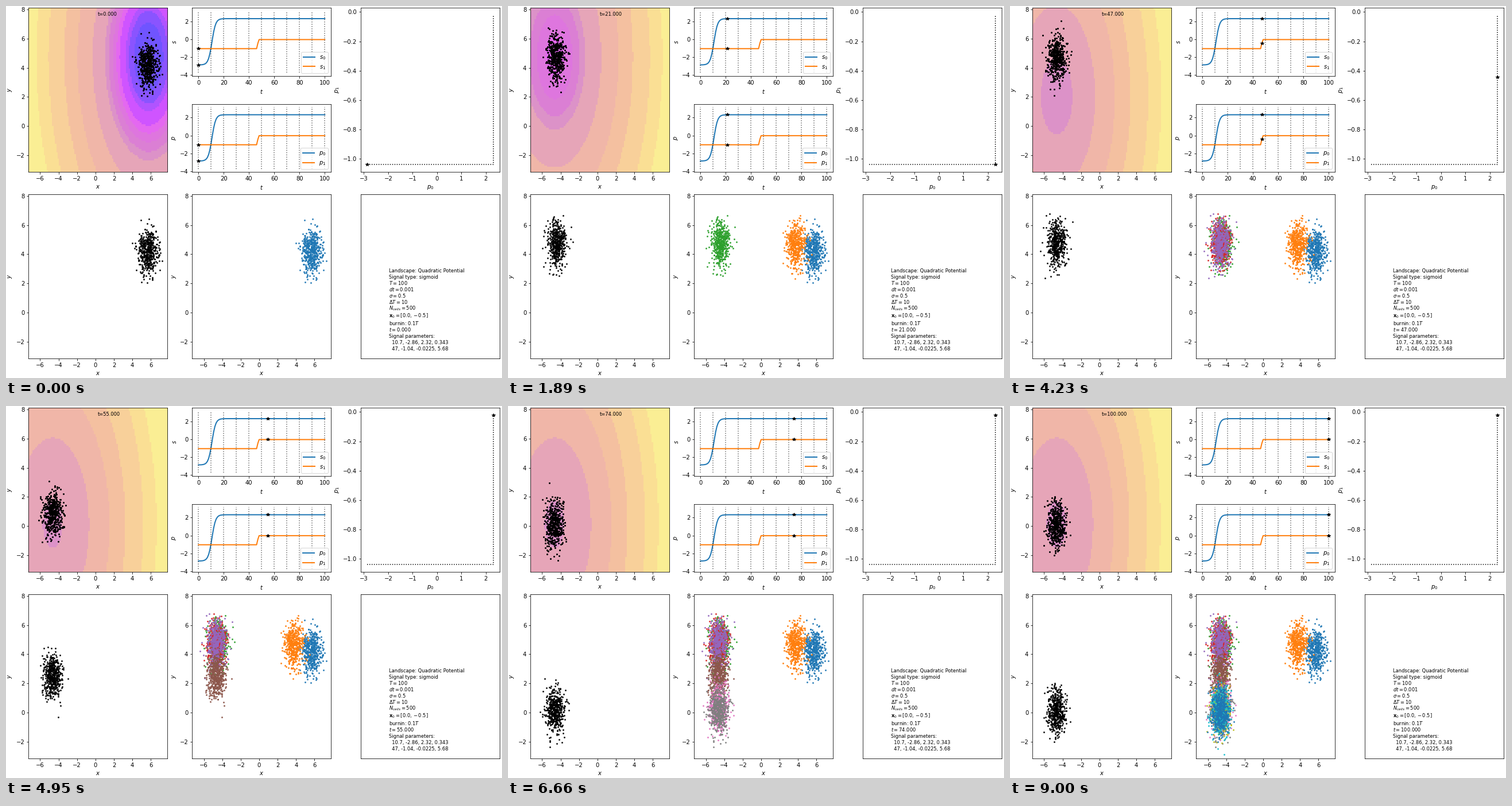
Write a matplotlib script that moves like this. It is 864x648 px and loops after 9.09 s.

```python
import numpy as np
import matplotlib.pyplot as plt
from matplotlib.animation import FuncAnimation
from matplotlib.colors import BoundaryNorm, ListedColormap

W, H, DPI = 864, 648, 72
T, DELTA, BURN = 100, 10, 10
N_CELLS, SIGMA = 500, 0.5
K = np.array([0.5, 0.22])            # stiffness of the potential in x and y
XLIM, YLIM = (-7.26, 7.80), (-3.15, 8.12)

# panel edges in pixels from the top left
LEFT, MID, RIGHT = 39.2, 324.3, 618.4
UPPER, LOWER = (3.2, 289.0), (328.0, 613.8)

LEVELS = [-99, -10, -9.5, -9.1, -8.2, -7.6, -6.9, -6.0, -5.1, -1.5,
          4, 10, 18.5, 26, 199]
BANDS = [(112, 84, 255), (138, 84, 255), (176, 84, 255), (207, 84, 255),
         (228, 104, 240), (222, 118, 222), (219, 127, 212), (220, 146, 200),
         (230, 165, 184), (240, 182, 168), (244, 192, 160), (248, 208, 154),
         (250, 223, 148), (250, 238, 148)]

INFO = [
    "Landscape: Quadratic Potential",
    "Signal type: sigmoid",
    r"$T=100$",
    r"$dt=0.001$",
    r"$\sigma=0.5$",
    r"$\Delta T=10$",
    r"$N_{cells}=500$",
    r"$\mathbf{x}_0=[0.0, -0.5]$",
    r"burnin: $0.1T$",
    "",
    "Signal parameters:",
    "  10.7, -2.86, 2.32, 0.343",
    "  47, -1.04, -0.0225, 5.68",
]
TIME_ROW = INFO.index("")


def sigmoid(t, center, low, high, rate):
    return low + (high - low) / 2 * (1 + np.tanh(rate * (t - center)))


def signal(t):
    t = np.maximum(t, 0)
    return np.array([sigmoid(t, 10.68, -2.86, 2.32, 0.343),
                     sigmoid(t, 46.97, -1.04, -0.0225, 5.68)])


def simulate(dt=0.02):
    """Euler-Maruyama run; returns the cells at every whole time."""
    rng = np.random.default_rng(7)
    cells = np.tile([0.0, -0.5], (N_CELLS, 1))
    per_unit = round(1 / dt)
    kept = []
    for i in range((BURN + T) * per_unit + 1):
        t = i * dt - BURN
        if i >= BURN * per_unit and i % per_unit == 0:
            kept.append(cells.copy())
        noise = rng.standard_normal(cells.shape)
        cells = cells - (K * cells + signal(t)) * dt + SIGMA * np.sqrt(dt) * noise
    return kept


def centers(lim, n=100):
    edges = np.linspace(*lim, n + 1)
    return (edges[1:] + edges[:-1]) / 2


GX, GY = np.meshgrid(centers(XLIM), centers(YLIM))


def potential(p):
    return K[0] / 2 * GX**2 + K[1] / 2 * GY**2 + p[0] * GX + p[1] * GY


times = np.arange(T + 1)
sig = signal(times)
cells = simulate()

fig = plt.figure(figsize=(W / DPI, H / DPI), dpi=DPI)


def panel(left, span, xlabel="", ylabel="", width=242):
    top, bottom = span
    ax = fig.add_axes([left / W, 1 - bottom / H, width / W, (bottom - top) / H])
    ax.set_xlabel(xlabel)
    ax.set_ylabel(ylabel)
    return ax


def plane(left, span):
    ax = panel(left, span, "$x$", "$y$")
    ax.set_xticks(range(-6, 7, 2))
    ax.set_yticks(range(-2, 9, 2))
    ax.set_xlim(XLIM)
    ax.set_ylim(YLIM)
    return ax


def dots(ax, xy, color, alpha=1.0):
    return ax.plot(*xy.T, ".", color=color, ms=4, alpha=alpha)[0]


def signal_panel(span, name):
    ax = panel(MID, span, "$t$", f"${name}$")
    for i in range(2):
        ax.plot(times, sig[i], lw=2, label=f"${name}_{i}$")
    ax.vlines(np.arange(0, T + 1, DELTA), -3.73, 3.18, colors="k",
              linestyles=":", linewidth=1.5, alpha=0.6)
    ax.set_xticks(range(0, 101, 20))
    ax.set_yticks(range(-4, 3, 2))
    ax.set_xlim(-5, 105)
    ax.set_ylim(-4.08, 3.53)
    ax.legend(loc="lower right")
    return ax.plot([0, 0], sig[:, 0], "k*")[0]


def info_lines(x=667, last=599.6, step=10.95, extra=2):
    """Place the lines upwards from the last; the bracketed one needs more room."""
    texts, y = [], last
    for row, line in reversed(list(enumerate(INFO))):
        texts.insert(0, fig.text(x / W, 1 - y / H, line, fontsize="small"))
        near = "[" in line or (row > 0 and "[" in INFO[row - 1])
        y -= step + extra * near
    return texts


# landscape with the moving cells
ax_land = plane(LEFT, UPPER)
heat = ax_land.imshow(potential(sig[:, 0]), origin="lower", aspect="auto",
                      extent=(*XLIM, *YLIM), interpolation="nearest",
                      cmap=ListedColormap(np.array(BANDS) / 255),
                      norm=BoundaryNorm(LEVELS, len(BANDS)))
live = dots(ax_land, cells[0], "k")
clock = ax_land.text(0.5, 0.95, "", fontsize="small",
                     transform=ax_land.transAxes)

# signals and parameters over time
stars = [signal_panel((3.2, 121.6), "s"), signal_panel((170.6, 289.0), "p")]

# path through parameter space
ax_path = panel(RIGHT, UPPER, "$p_0$", "$p_1$")
ax_path.plot(*sig, "k:")
ax_path.set_xticks(range(-3, 3))
ax_path.set_yticks(np.linspace(-1, 0, 6))
ax_path.set_xlim(-3.116, 2.577)
ax_path.set_ylim(-1.091, 0.0284)
path_star = ax_path.plot([0], [0], "k*")[0]

# latest snapshot, and all snapshots so far
latest = dots(plane(LEFT, LOWER), cells[0], "k", 0.8)
ax_all = plane(MID, LOWER)
snaps = [dots(ax_all, cells[t], f"C{i % 10}", 0.8)
         for i, t in enumerate(range(0, T + 1, DELTA))]

ax_info = panel(RIGHT, LOWER)
ax_info.set_xticks([])
ax_info.set_yticks([])
info_time = info_lines()[TIME_ROW]


def update(t):
    heat.set_data(potential(sig[:, t]))
    live.set_data(*cells[t].T)
    clock.set_text(f"t={t:.3f}")
    for star in stars:
        star.set_data([t, t], sig[:, t])
    path_star.set_data([sig[0, t]], [sig[1, t]])
    last = t // DELTA
    latest.set_data(*cells[last * DELTA].T)
    for i, snap in enumerate(snaps):
        snap.set_visible(i <= last)
    info_time.set_text(f"$t={t:.3f}$")


anim = FuncAnimation(fig, update, frames=T + 1, interval=90,
                     init_func=lambda: update(0), repeat=True, repeat_delay=0)
plt.show()
```
